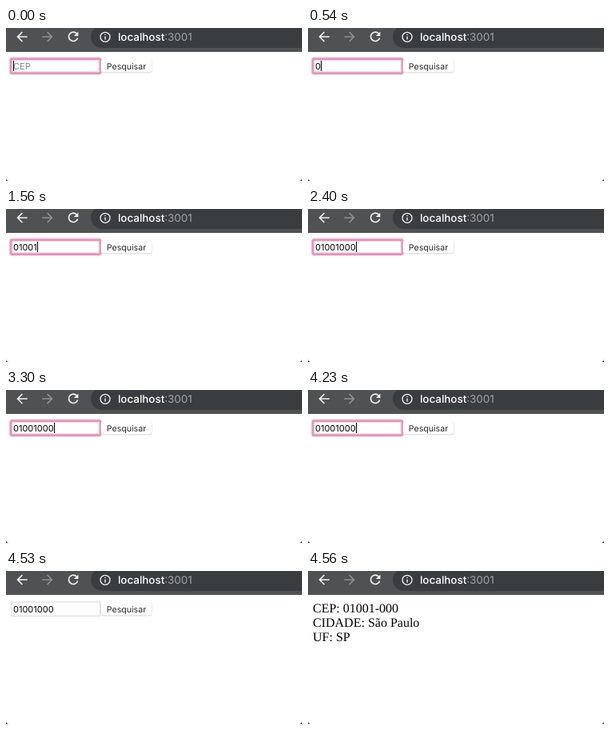
An HTML page that plays this animation: 370 px wide and 192 px high, repeating every 6360 ms.

```html
<!DOCTYPE html>
<html lang="pt-BR">
<head>
<meta charset="utf-8">
<title>CEP</title>
<style>
  html, body { margin: 0; width: 370px; height: 192px; overflow: hidden; background: #3a3a3a; }
  svg { display: block; text-rendering: geometricPrecision; }
  .ui { font: 11px Inter, Roboto, sans-serif; }
  .url { font: 13.4px Inter, Roboto, sans-serif; }
  .result { font: 16px "Liberation Serif", Times, serif; }
  .icon { fill: none; stroke: #f1f1f2; stroke-width: 1.7; }
</style>
</head>
<body>
<svg width="370" height="192" viewBox="0 0 370 192">
  <defs>
    <linearGradient id="pink" x2="0" y2="1">
      <stop stop-color="#e97fbb"/>
      <stop offset="1" stop-color="#c94f97"/>
    </linearGradient>
    <path id="arrow" d="M6.8 0H-5.6M.4-6L-5.4 0L.4 6"/>
  </defs>

  <path d="M0 0H370V188Q370 192 366 192H4Q0 192 0 188Z" fill="#fff"/>

  <!-- browser bar -->
  <rect width="370" height="30" fill="#505153"/>
  <rect x="106" y="-3" width="290" height="28" rx="14" fill="#3a3d40"/>
  <g class="icon">
    <use href="#arrow" x="20" y="11"/>
    <use href="#arrow" transform="translate(52 11) scale(-1 1)" stroke="#8f9092"/>
    <path d="M88.4 7A5.7 5.7 0 1 0 89.6 12.4"/>
    <path d="M90.4 4.4V10H84.8Z" fill="#f1f1f2" stroke="none"/>
    <circle cx="124" cy="11.3" r="6" stroke-width="1.3"/>
    <path d="M124 10.4V14.6M124 7.7V9.1" stroke-width="1.4"/>
  </g>
  <text class="url" x="140" y="16" fill="#a3a6a9"><tspan fill="#fff" font-weight="500">localhost</tspan>:3001</text>

  <g id="form" class="ui">
    <rect x="6.5" y="39" width="111" height="17.5" fill="#fff" stroke="#d8d8d8"/>
    <g id="ring" fill="none" stroke="#d987b1">
      <rect x="6" y="38.75" width="112" height="18" rx="2" stroke-width="5" opacity=".35"/>
      <rect x="6" y="38.75" width="112" height="18" rx="1.5" stroke-width="2.4" opacity=".75"/>
    </g>
    <text id="hint" x="9" y="52" fill="#858585">CEP</text>
    <text id="value" x="9" y="52" fill="#000"></text>
    <rect id="caret" y="41" width="1" height="13" fill="#000"/>

    <rect x="118.5" y="39" width="64" height="17.5" rx="3.5" fill="#d6d6d6"/>
    <rect x="119" y="39" width="63" height="16.5" rx="3" fill="#fff"/>
    <rect id="press" x="118.5" y="39" width="64" height="17.5" rx="3" fill="url(#pink)"/>
    <text id="label" x="150.5" y="52" font-size="10.6" text-anchor="middle">Pesquisar</text>
  </g>

  <g id="result" class="result">
    <text x="6" y="52">CEP: 01001-000</text>
    <text x="6" y="70">CIDADE: São Paulo</text>
    <text x="6" y="88">UF: SP</text>
  </g>
</svg>
<script>
const LOOP = 6360, CLICK = 4440, RELEASE = 4500, FADED = 4530, DONE = 4560;
const CODE = "01001000";
const keyTimes = [540, 720, 1020, 1260, 1560, 1950, 2220, 2400];
const blinkTimes = [2850, 3300, 3780, 4230];
const $ = id => document.getElementById(id);
const show = (id, on) => $(id).style.display = on ? "" : "none";
const passed = (times, t) => times.filter(at => at <= t).length;

function draw(t) {
  const typed = passed(keyTimes, t);
  const focused = t < CLICK;
  const pressed = t >= CLICK && t < FADED;
  const caretOn = typed ? passed(blinkTimes, t) % 2 === 0 : t < 150;

  show("form", t < DONE);
  show("result", t >= DONE);
  show("ring", focused);
  show("hint", !typed);
  show("caret", focused && caretOn);
  show("press", pressed);
  $("press").style.opacity = t < RELEASE ? 1 : .5;
  $("label").style.fill = pressed ? "#6e2350" : "#282828";

  const value = $("value");
  value.textContent = CODE.slice(0, typed);
  if (t < DONE) {
    const width = typed ? value.getComputedTextLength() : 0;
    $("caret").setAttribute("x", Math.round(9 + width));
  }
}

function tick() {
  draw(performance.now() % LOOP);
  requestAnimationFrame(tick);
}
tick();
</script>
</body>
</html>
```
